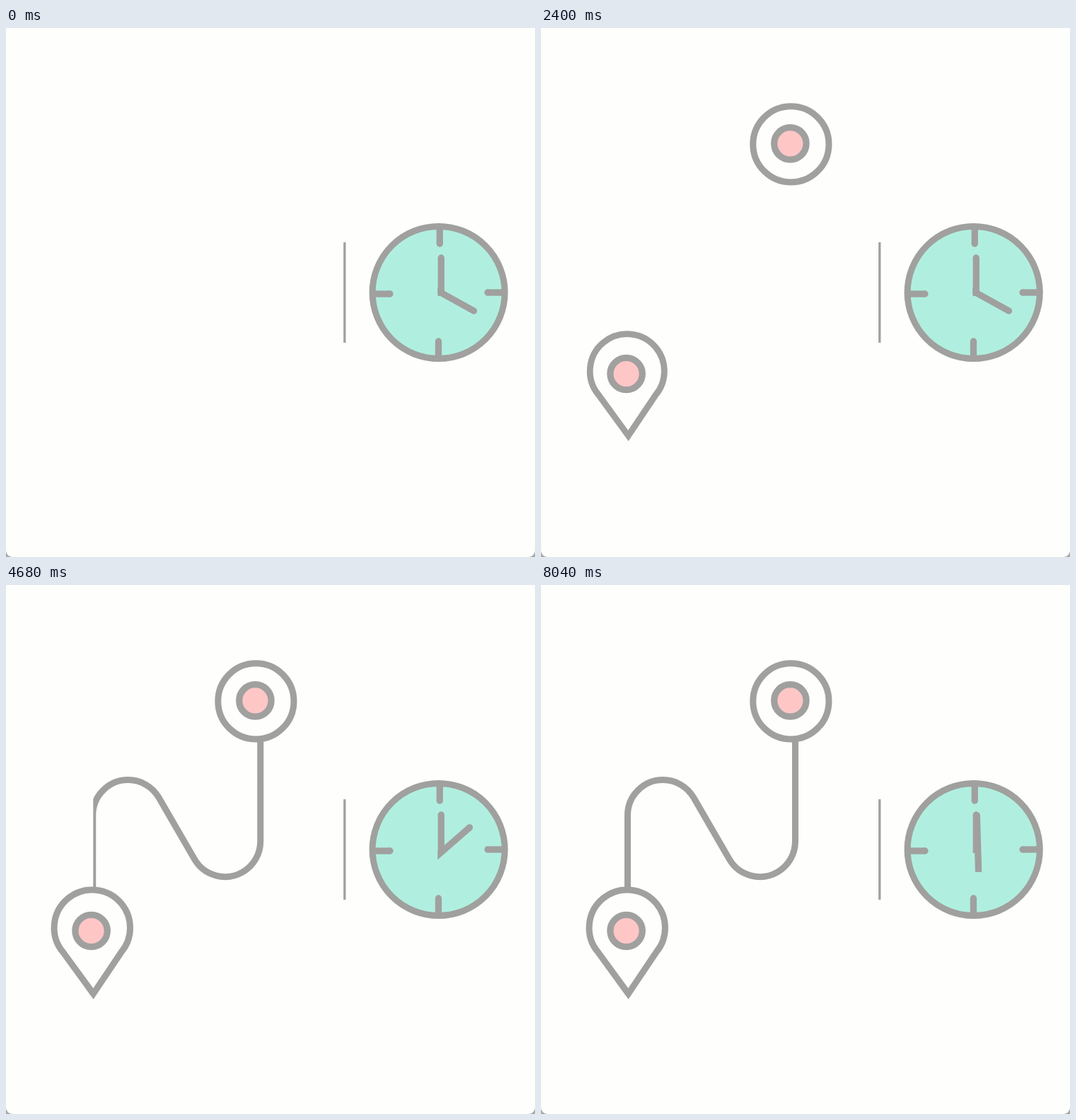
An HTML page with a canvas for the animation above (8.06 s loop, 748x748 px).

```html
<!DOCTYPE html>
<html>
<head>
<meta charset="utf-8">
<style>
html, body { margin: 0; width: 100%; height: 100%; overflow: hidden; background: #fefefd; }
canvas { display: block; width: 748px; height: 748px; }
</style>
</head>
<body>
<canvas id="stage" width="748" height="748"></canvas>
<script>
const SIZE = 748, LOOP = 8060, STEP = 20;
const GREY = '#a0a09f', MINT = '#b0efdf', PINK = '#ffc6c6', PAPER = '#fefefd';
const RAD = Math.PI / 180;
const ctx = document.getElementById('stage').getContext('2d');

// Underdamped spring from 0 to 1; first peak after `peak` ms.
function bounce(t, peak, overshoot) {
  if (t <= 0) return 0;
  const k = -Math.log(overshoot) / Math.PI;
  const a = Math.PI * t / peak;
  return 1 - Math.exp(-k * a) * (Math.cos(a) + k * Math.sin(a));
}

// Critically damped spring from 0 to 1.
function glide(t, tau) {
  const x = Math.max(0, t) / tau;
  return 1 - (1 + x) * Math.exp(-x);
}

function stroke(width, cap = 'butt') {
  ctx.lineWidth = width;
  ctx.lineCap = cap;
  ctx.strokeStyle = GREY;
  ctx.stroke();
}

function disc(x, y, r, fill, width) {
  ctx.beginPath();
  ctx.arc(x, y, r, 0, 2 * Math.PI);
  ctx.fillStyle = fill;
  ctx.fill();
  stroke(width);
}

function bar(x1, y1, x2, y2, width = 9.3, cap = 'butt') {
  ctx.beginPath();
  ctx.moveTo(x1, y1);
  ctx.lineTo(x2, y2);
  stroke(width, cap);
}

// Bar with a flat start and a round end.
function hand(x1, y1, x2, y2) {
  bar(x1, y1, x2, y2);
  ctx.beginPath();
  ctx.arc(x2, y2, 4.65, 0, 2 * Math.PI);
  ctx.fillStyle = GREY;
  ctx.fill();
}

function scaled(x, y, s, draw) {
  if (s <= 0) return;
  ctx.save();
  ctx.translate(x, y);
  ctx.scale(s, s);
  ctx.translate(-x, -y);
  draw();
  ctx.restore();
}

function paper() {
  ctx.fillStyle = '#a8a8a8';
  ctx.fillRect(0, 0, SIZE, SIZE);
  ctx.beginPath();
  ctx.roundRect(0, 0, SIZE, SIZE, [0, 0, 9, 9]);
  ctx.fillStyle = PAPER;
  ctx.fill();
}

function clock(t) {
  bar(478.8, 303, 478.8, 445, 3.3);
  disc(611.7, 374, 93.6, MINT, 9);
  hand(613.3, 280, 613.3, 305);
  hand(611.5, 468, 611.5, 443);
  hand(518, 376, 543, 376);
  hand(706, 374, 681, 374);
  hand(615.3, 379, 615.3, 325);

  const a = (29 - 125 * glide(t - 2760, 1020)) * RAD;
  const c = Math.cos(a), s = Math.sin(a);
  ctx.save();
  ctx.beginPath();
  ctx.rect(610.3, 270, 110, 210);
  ctx.clip();
  hand(617.8 - 30 * c, 375.8 - 30 * s, 617.8 + 50 * c, 375.8 + 50 * s);
  ctx.restore();
}

// The route is uncovered from right to left.
function route(t) {
  if (t < 2740) return;
  const edge = 365 - 251 * glide(t - 2740, 380);
  const dx = (edge - 114) * 0.025;
  ctx.save();
  ctx.beginPath();
  ctx.rect(edge, 150, 400 - edge, 400);
  ctx.clip();
  ctx.beginPath();
  ctx.moveTo(122.5 + dx, 470);
  ctx.arc(172.5 + dx, 325.6, 50, Math.PI, -30 * RAD);
  ctx.arc(309.5 + dx, 362.6, 50, 150 * RAD, 0, true);
  ctx.lineTo(359.5 + dx, 180);
  stroke(9);
  ctx.restore();
}

function pin() {
  ctx.beginPath();
  ctx.moveTo(123.5, 578);
  ctx.arc(121.8, 484.7, 53.7, 140 * RAD, 40 * RAD);
  ctx.closePath();
  ctx.lineJoin = 'miter';
  ctx.fillStyle = PAPER;
  ctx.fill();
  stroke(9);
}

function dot(x, y, t) {
  scaled(x, y, bounce(t, 60, 0.1), () => disc(x, y, 22.7, PINK, 9.3));
}

function draw(t) {
  paper();
  clock(t);
  route(t);
  scaled(353.4, 164.4, bounce(t - 1250, 125, 0.17),
    () => disc(353.4, 164.4, 53.6, PAPER, 9));
  dot(352.4, 163.4, t - 990);
  scaled(121.8, 506.5, bounce(t - 2120, 125, 0.17), pin);
  dot(120.6, 489, t - 1850);
}

const start = performance.now();
function tick() {
  const t = (performance.now() - start) % LOOP;
  draw(Math.floor(t / STEP) * STEP);
  requestAnimationFrame(tick);
}
tick();
</script>
</body>
</html>
```
